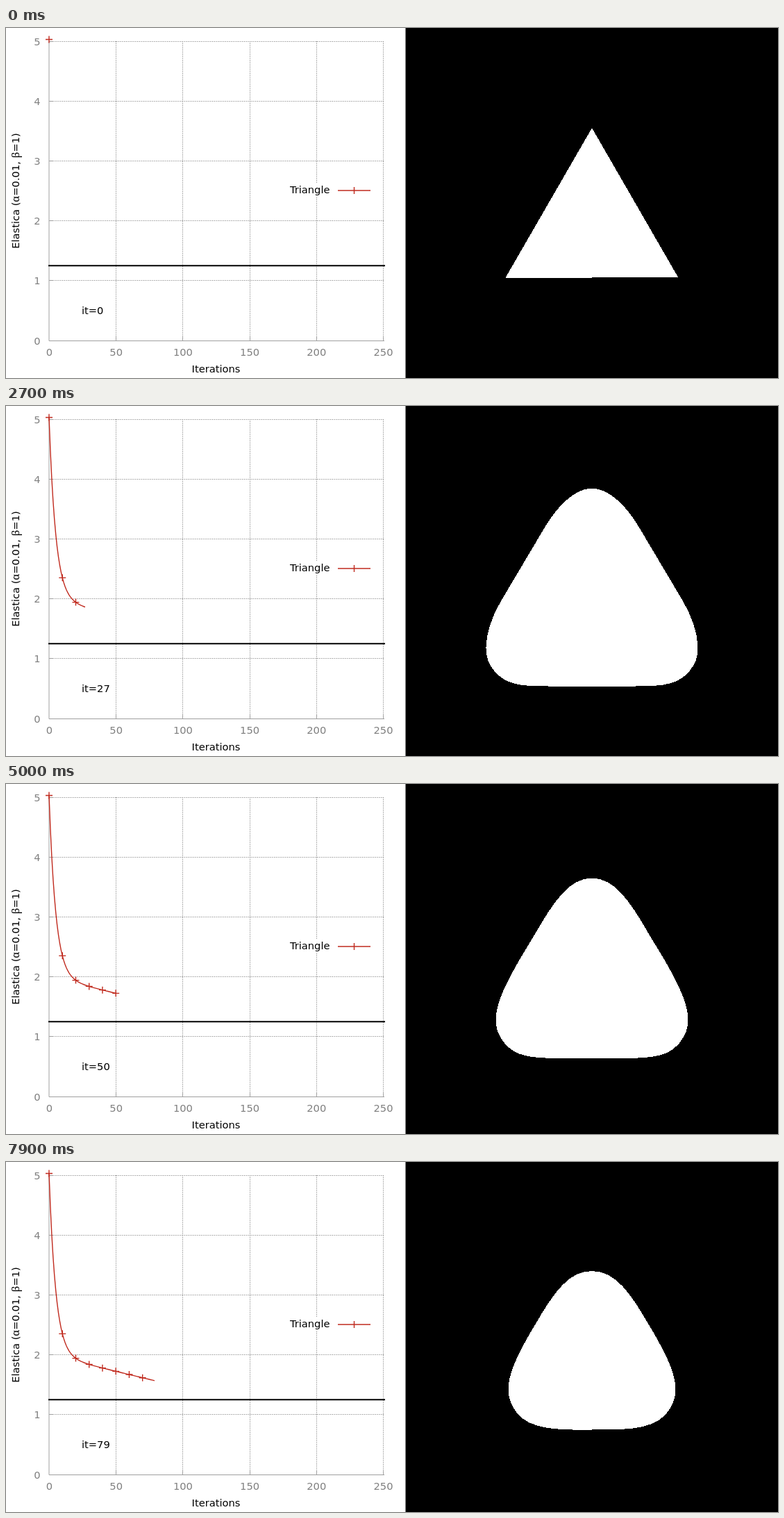
These frames come from a looping animation (1112x504 px, 8 s). An HTML page:

```html
<!DOCTYPE html>
<html lang="en">
<head>
<meta charset="utf-8">
<title>Elastica flow</title>
<style>
  html, body { margin: 0; width: 100%; height: 100%; overflow: hidden; background: #fff; }
  svg { display: block; }
  text { font: 14.67px "DejaVu Sans", sans-serif; }
  .tick { fill: #808080; }
  .greek { font-family: "Noto Serif", serif; }
  .grid { stroke: #909090; stroke-dasharray: 1.3 1.4; fill: none; }
  .axis { stroke: #a0a0a0; fill: none; }
  .red { stroke: #c02a1e; stroke-width: 1.4; fill: none; }
</style>
</head>
<body>
<svg width="1112" height="504" viewBox="0 0 1112 504">
  <rect width="1112" height="504" fill="#fff"/>
  <path id="grid" class="grid"/>
  <path id="axis" class="axis"/>
  <g id="labels" class="tick"></g>
  <text x="302.5" y="496" text-anchor="middle">Iterations</text>
  <text transform="translate(18.5 234.5) rotate(-90)" text-anchor="middle">Elastica (<tspan class="greek">α</tspan>=0.01, <tspan class="greek">β</tspan>=1)</text>
  <text x="466.5" y="238" text-anchor="end">Triangle</text>
  <path class="red" d="M478 234H525M501.5 229V239"/>
  <path id="curve" class="red" stroke-linejoin="round"/>
  <path id="marks" class="red"/>
  <path d="M61 342.2H546" stroke="#000" stroke-width="2"/>
  <text id="count" x="109" y="412"></text>
  <rect x="575.5" width="536.5" height="504"/>
  <g shape-rendering="crispEdges">
    <path id="shape" fill="#fff"/>
    <rect id="step" x="844" width="160" height="2"/>
  </g>
</svg>
<script>
const STEP = 100, STEPS = 80, PEAK = 21;
const CX = 844, CY = 288;

const el = id => document.getElementById(id);
const px = it => 62 + it * 1.924;
const py = v => 450.5 - v * 86.2;
const rad = deg => deg * Math.PI / 180;
const clamp = u => Math.min(1, Math.max(0, u));
const smooth = u => u * u * (3 - 2 * u);

// fast smoothing of the corners, then a slow steady decrease
const energy = it => 2 - 0.0054 * it + 3.035 * Math.exp(-it / 5);

function drawChart() {
  let grid = "", axis = "M62 19V450.5H545", labels = "";
  const label = (x, y, anchor, s) =>
    labels += `<text x="${x}" y="${y}" text-anchor="${anchor}">${s}</text>`;
  for (let i = 0; i <= 5; i++) {
    const x = Math.round(px(i * 50)) + 0.5, y = Math.round(py(i)) - 0.5;
    if (i) {
      grid += `M62 ${y}H545`;
      grid += i === 4 ? `M${x} 19V224M${x} 244V450` : `M${x} 19V450`;
      axis += `M62 ${y}h6M${x} 450.5v-6`;
    }
    label(49.5, py(i) + 5, "end", i);
    label(px(i * 50) + 0.5, 471.5, "middle", i * 50);
  }
  el("grid").setAttribute("d", grid);
  el("axis").setAttribute("d", axis);
  el("labels").innerHTML = labels;
}

// The triangle swells until PEAK, then shrinks while its corners keep rounding.
function formAt(it) {
  const grow = clamp(it / PEAK), shrink = clamp((it - PEAK) / (STEPS - 1 - PEAK));
  return {
    tip: 144 + 30 * grow - 43 * shrink,
    side: 72 + 45.6 * grow - 19.6 * smooth(shrink),
    slope: rad(60 * Math.exp(-it / 7)),
    tipHandle: 34 * (1 - Math.exp(-it / 17)),
    sideHandle: 60 * Math.sin(clamp(it / 70) * Math.PI / 2),
    straight: 72 * Math.sqrt(3) * (1 - it / STEPS) ** 1.75,
    bulge: (it / 25 * Math.exp(1 - it / 25)) ** 2
  };
}

// Half a corner, from its tip to the straight side, with the tip pointing up.
function halfCorner(form, side, swell) {
  const c = Math.cos(rad(30)), s = 0.5;
  const a = form.tipHandle * swell, k = form.sideHandle * swell;
  const x = -side * c + form.straight * s, y = -side * s - form.straight * c;
  return [
    [0, -form.tip],
    [-a * Math.cos(form.slope), -form.tip + a * Math.sin(form.slope)],
    [x + k * s, y - k * c],
    [x, y]
  ];
}

function outline(form) {
  const slanted = form.side - 1.5 * form.bulge;
  const top = halfCorner(form, slanted, 1);
  const outer = halfCorner(form, slanted, 1 + 0.28 * form.bulge);
  const base = halfCorner(form, form.side, 1);
  const mirror = half => half.map(([x, y]) => [-x, y]);
  const corners = [[top, top], [outer, base], [base, outer]];

  return corners.map(([left, right], i) => {
    const t = rad(-120 * i), co = Math.cos(t), si = Math.sin(t);
    const put = ([x, y]) =>
      `${(CX + x * co - y * si).toFixed(2)} ${(CY + x * si + y * co).toFixed(2)} `;
    const r = mirror(right).map(put), l = left.map(put);
    return `${i ? "L" : "M"}${r[3]}C${r[2]}${r[1]}${r[0]}C${l[1]}${l[2]}${l[3]}`;
  }).join("") + "Z";
}

function draw(it) {
  let curve = "", marks = "";
  for (let i = 0; i <= it; i++) {
    const x = px(i), y = py(energy(i));
    curve += `${i ? "L" : "M"}${x.toFixed(2)} ${y.toFixed(2)}`;
    if (i % 10 === 0) marks += `M${x - 5} ${y}h10M${x} ${y - 5}v10`;
  }
  const form = formAt(it);
  el("curve").setAttribute("d", curve);
  el("marks").setAttribute("d", marks);
  el("count").textContent = "it=" + it;
  el("shape").setAttribute("d", outline(form));
  el("step").setAttribute("y", CY + form.side - 1);
}

let start, last = -1;
function tick(now) {
  start ??= now;
  const it = Math.floor((now - start) / STEP) % STEPS;
  if (it !== last) draw(last = it);
  requestAnimationFrame(tick);
}

drawChart();
draw(0);
requestAnimationFrame(tick);
</script>
</body>
</html>
```
